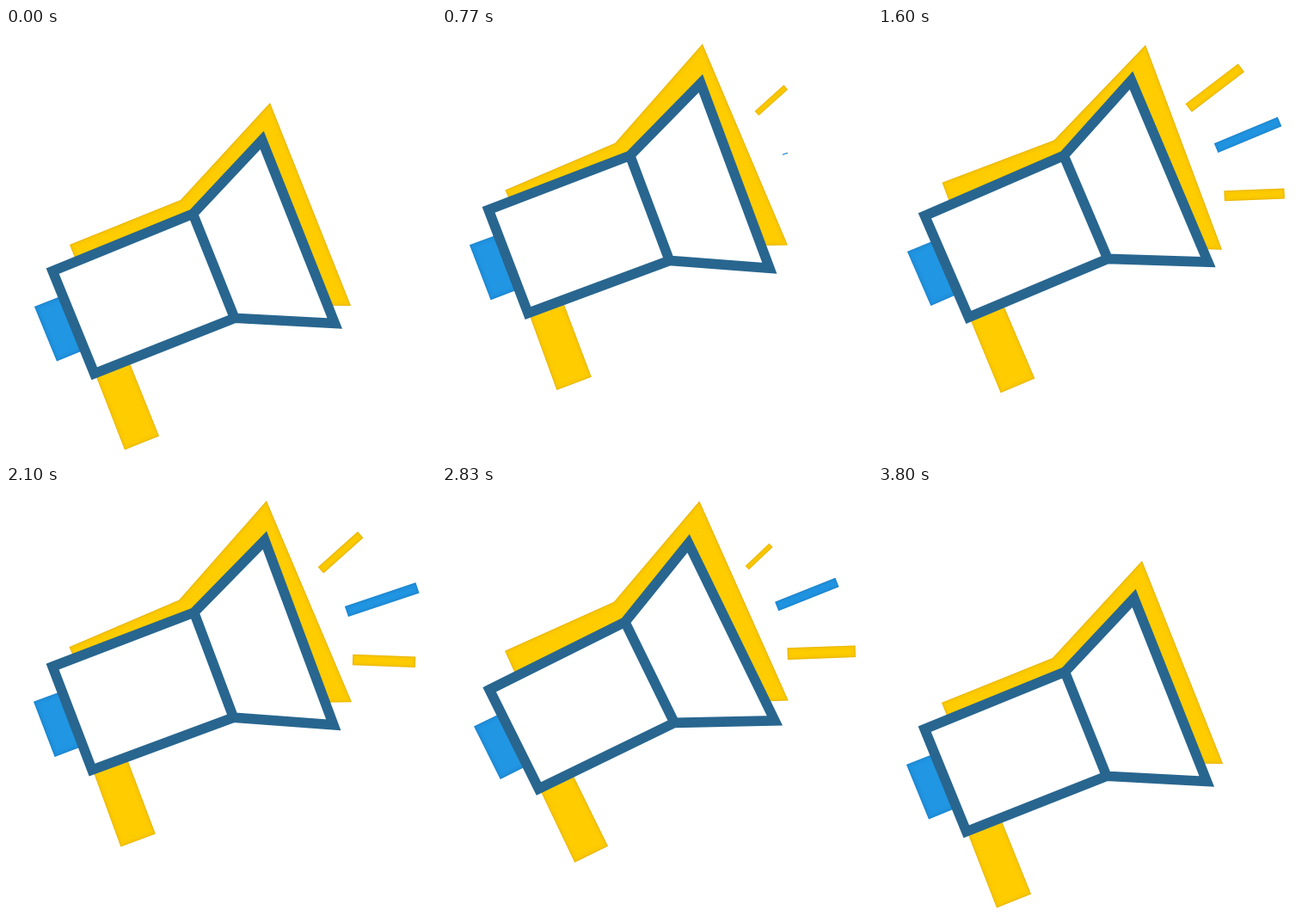
An HTML page with a canvas for the animation above (4.01 s loop, 500 by 500 pixels).

```html
<!DOCTYPE html>
<html lang="en">
<head>
<meta charset="utf-8">
<title>Megaphone</title>
<style>
  html, body { margin: 0; width: 100%; height: 100%; overflow: hidden; background: #fff; }
  canvas { display: block; width: 500px; height: 500px; }
</style>
</head>
<body>
<canvas id="stage" width="500" height="500"></canvas>
<script>
const ctx = document.getElementById('stage').getContext('2d');
const LOOP = 4010, STEP = 100 / 3, LAST = 114;
const LIFT = 68.5, PIVOT = [247, 277];
const YELLOW = '#ffcc00', BLUE = '#2196e3', NAVY = '#28668f';
const YELLOW_EDGE = '#a87800', BLUE_EDGE = '#0b4f8a';

const shadow = [[74, 252], [203, 200], [307, 87], [401, 323], [254, 322], [126, 381]];
const handle = [[104, 403], [138, 490.5], [178, 474.5], [142, 385]];
const tail = [[33, 324], [59, 387.5], [92, 374], [66, 311]];
const body = [[54.2, 282.7], [217.3, 216.2], [297.7, 130.5], [382.3, 343.5], [265.8, 337.3], [102.7, 401.8]];

// Length and angle swing as mean + c * cos + s * sin.
const rays = [
  { at: [363.6, 163.9], color: YELLOW, edge: YELLOW_EDGE, len: [69.5, -7.5, 3], turn: [-39.6, -3.5, 1.5], thick: .155, show: 550, hide: 2980 },
  { at: [394.6, 211.3], color: BLUE, edge: BLUE_EDGE, len: [83.5, 3.5, -5], turn: [-20.6, .8, 3], thick: .148, show: 750, hide: 3180 },
  { at: [402.9, 267.1], color: YELLOW, edge: YELLOW_EDGE, len: [71.5, 1.5, 8], turn: [0, 1, 2], thick: .172, show: 800, hide: 3250 }
];

const rad = deg => deg * Math.PI / 180;
const clamp = x => Math.min(1, Math.max(0, x));
const smooth = (a, b, t) => { const u = clamp((t - a) / (b - a)); return u * u * (3 - 2 * u); };
const easeOut = u => 1 - (1 - clamp(u)) ** 2;
const swing = ([mean, c, s], phase) => mean + c * Math.cos(phase) + s * Math.sin(phase);
const cycle = frames => 2 * Math.PI * frames / 10;

function trace(points) {
  ctx.beginPath();
  points.forEach(p => ctx.lineTo(...p));
  ctx.closePath();
}

// Flat fill with a soft darker rim kept inside the shape.
function solid(points, color, edge) {
  ctx.save();
  trace(points);
  ctx.fillStyle = color;
  ctx.fill();
  ctx.clip();
  ctx.strokeStyle = edge;
  for (const [width, alpha] of [[2, .2], [6, .05], [11, .03]]) {
    ctx.lineWidth = width;
    ctx.globalAlpha = alpha;
    ctx.stroke();
  }
  ctx.restore();
}

function posed(rise, deg, draw) {
  ctx.save();
  ctx.translate(PIVOT[0], PIVOT[1] - rise);
  ctx.rotate(rad(deg));
  ctx.translate(-PIVOT[0], -PIVOT[1]);
  draw();
  ctx.restore();
}

function drawRay(ray, t, phase) {
  const grow = easeOut((t - ray.show) / 450) * easeOut((ray.hide - t) / 450);
  if (grow <= 0) return;
  const len = swing(ray.len, phase) * grow, half = len * ray.thick / 2;
  ctx.save();
  ctx.translate(...ray.at);
  ctx.rotate(rad(swing(ray.turn, phase)));
  solid([[0, -half], [len, -half], [len, half], [0, half]], ray.color, ray.edge);
  ctx.restore();
}

function drawHorn() {
  solid(tail, BLUE, BLUE_EDGE);
  solid(handle, YELLOW, YELLOW_EDGE);
  trace(body);
  ctx.fillStyle = '#fff';
  ctx.fill();
  ctx.moveTo(...body[1]);
  ctx.lineTo(...body[4]);
  ctx.strokeStyle = NAVY;
  ctx.lineWidth = 11.6;
  ctx.stroke();
}

// Rocking while raised, then one slow return to rest.
function tilt(frame, t, zero, rest) {
  const rock = -4 * Math.sin(cycle(frame - zero)) * smooth(500, 700, t);
  const settle = rest * (1 - smooth(2830, 3800, t));
  const mix = smooth(2740, 2830, t);
  return rock * (1 - mix) + settle * mix;
}

function render(frame) {
  const t = frame * STEP, phase = cycle(frame - 33);
  const up = smooth(0, 835, t);
  const shadowRise = LIFT * (up - smooth(2790, 3320, t));
  const hornRise = LIFT * (up - smooth(2700, 3320, t));
  ctx.fillStyle = '#fff';
  ctx.fillRect(0, 0, 500, 500);
  posed(shadowRise, tilt(frame, t, 32.5, -2.3), () => solid(shadow, YELLOW, YELLOW_EDGE));
  posed(hornRise, tilt(frame, t, 33.5, -4.3), () => {
    drawHorn();
    rays.forEach(ray => drawRay(ray, t, phase));
  });
}

// Frame starts fall on whole hundredths of a second.
function frameAt(ms) {
  let k = Math.ceil(ms / STEP);
  while (k > 0 && Math.round(k * STEP / 10) * 10 > ms) k--;
  return Math.min(k, LAST);
}

const start = performance.now();
function tick() {
  render(frameAt((performance.now() - start) % LOOP));
  requestAnimationFrame(tick);
}
tick();
</script>
</body>
</html>
```
